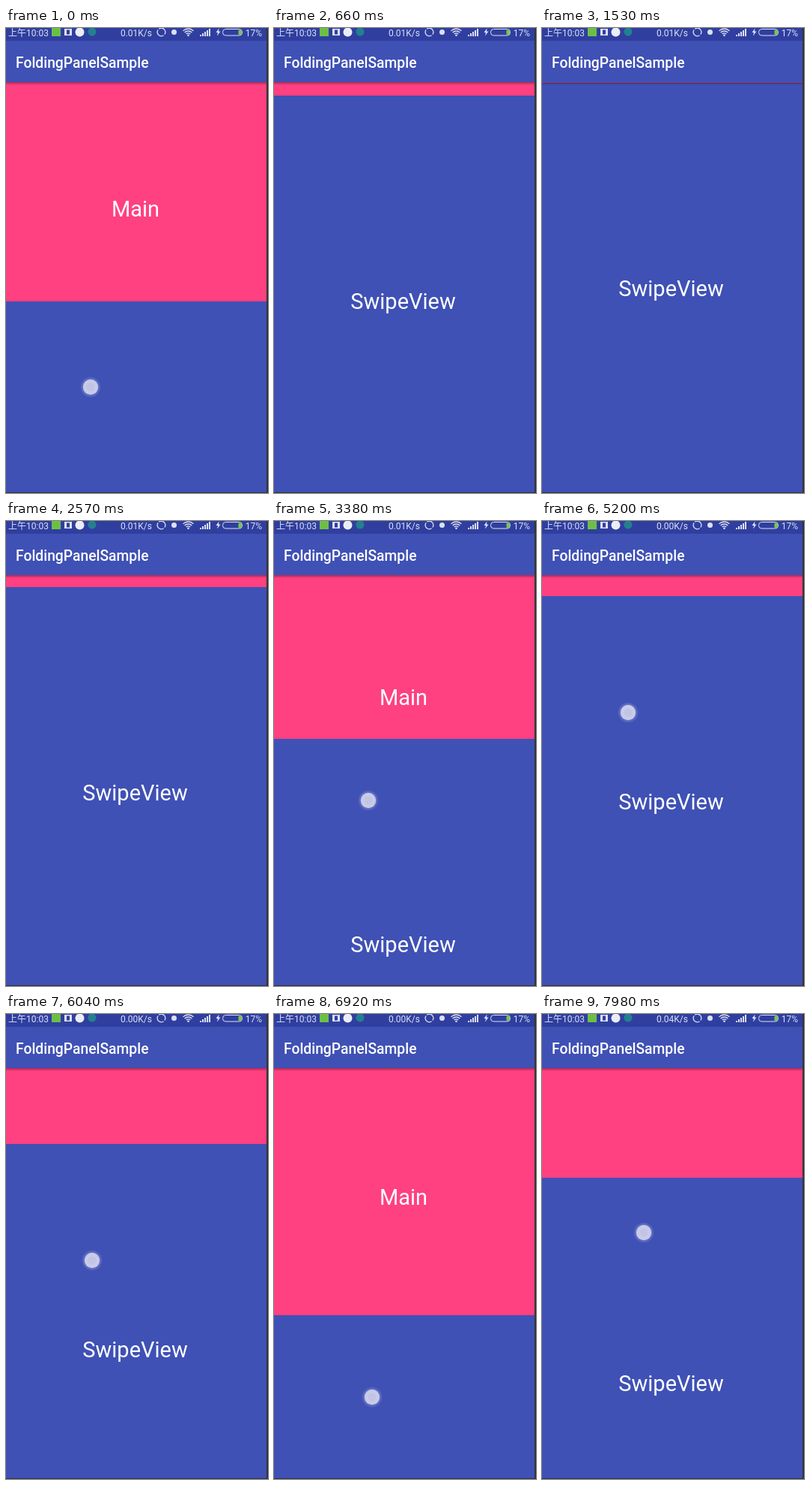
An HTML page with a canvas that plays this animation: 350 by 619 pixels, repeating every 8 s.

```html
<!DOCTYPE html>
<html lang="en">
<head>
<meta charset="utf-8">
<title>Swipe panel</title>
<style>
  html, body { margin: 0; width: 100%; height: 100%; overflow: hidden; background: #333; }
  canvas { display: block; }
</style>
</head>
<body>
<canvas id="stage" width="350" height="619"></canvas>
<script>
const c = document.getElementById('stage').getContext('2d');
const LOOP = 8000, W = 348, H = 618, BAR = 72;
const BLUE = '#3f51b5', PINK = '#ff4081', LIGHT = '#dce0f3';
const FONT = 'Roboto, "Noto Sans CJK SC", "Noto Sans CJK", sans-serif';

const TICKS = [[0, 0], [1, 120], [8, 1110], [9, 1260], [11, 1530], [17, 2300], [18, 2420], [19, 2570],
  [25, 3380], [26, 3530], [31, 4230], [33, 4510], [34, 4650], [41, 5650], [42, 5770], [44, 6040],
  [49, 6770], [50, 6920], [57, 7830], [58, 7980]];

// Top edge of the panel: [time, y]
const EDGE = [[0, 364], [250, 260], [450, 120], [600, 73], [700, 73], [1000, 330], [1250, 244],
  [1400, 120], [1530, 73], [1650, 73], [1900, 170], [2150, 244], [2400, 150], [2570, 88], [2650, 73],
  [2800, 73], [3380, 290], [3900, 414], [4230, 414], [4500, 300], [4750, 100], [4900, 73], [5050, 73],
  [5400, 400], [5500, 414], [5750, 310], [6040, 173], [6200, 73], [6350, 73], [6700, 390], [6800, 414],
  [6920, 401], [7060, 319], [7300, 73], [7400, 73], [7700, 319], [7830, 319], [7980, 218]];

// Finger presses: [from, to, x, distance below the edge]
const PRESSES = [[0, 480, 113, 114], [690, 1240, 118, 90], [1650, 2200, 122, 82], [2780, 4620, 126, 82],
  [5000, 6130, 115, 155], [6330, 7160, 131, 109], [7380, LOOP, 136, 73]];

function snap(t) {
  let i = TICKS.length - 1;
  while (TICKS[i][1] > t) i--;
  if (i === TICKS.length - 1) return TICKS[i][1];
  const [n0, t0] = TICKS[i], [n1, t1] = TICKS[i + 1];
  const step = (t1 - t0) / (n1 - n0);
  return t0 + Math.floor((t - t0) / step) * step;
}

function track(keys, t) {
  const i = keys.findIndex(k => k[0] > t);
  if (i < 0) return keys[keys.length - 1][1];
  const [t0, a] = keys[i - 1], [t1, b] = keys[i];
  return a + (b - a) * (t - t0) / (t1 - t0);
}

function rect(x, y, w, h, color) {
  c.fillStyle = color;
  c.fillRect(x, y, w, h);
}

function disc(x, y, r, color) {
  c.fillStyle = color;
  c.beginPath();
  c.arc(x, y, r, 0, 7);
  c.fill();
}

function arc(x, y, r, from, to) {
  c.beginPath();
  c.arc(x, y, r, from, to);
  c.stroke();
}

function round(x, y, w, h, r) {
  c.beginPath();
  c.roundRect(x, y, w, h, r);
}

function text(s, x, y, size, align = 'center', weight = 400, color = '#fff') {
  c.font = `${weight} ${size}px ${FONT}`;
  c.textAlign = align;
  c.fillStyle = color;
  c.fillText(s, x, y);
}

function statusBar(t) {
  rect(0, 0, W, 17, '#303f9f');
  const label = (s, x, align) => text(s, x, 10.5, 12, align, 400, LIGHT);
  label('上午10:03', 3, 'left');
  label(t < 3530 ? '0.01K/s' : t < 7400 ? '0.00K/s' : '0.04K/s', 195, 'right');
  label('17%', 342, 'right');

  rect(61, 0, 12, 11, '#6cbf45');
  rect(78, 1, 10, 9, LIGHT);
  rect(81, 2.5, 4, 6, '#303f9f');
  disc(98.5, 5.5, 6, '#eceef6');
  disc(115, 5, 5.5, '#24808f');
  disc(224.5, 5.5, 3.5, LIGHT);

  c.strokeStyle = LIGHT;
  c.lineWidth = 1.3;
  arc(207.5, 5.5, 5.3, -2.2, 0.6);
  arc(207.5, 5.5, 5.3, 0.95, 3.75);
  for (const r of [4, 7, 10]) arc(243.5, 11, r, -2.35, -0.8);
  disc(243.5, 9.8, 1.3, LIGHT);
  for (let i = 0; i < 5; i++) rect(259 + i * 3, 9 - i * 2, 2, 2 + i * 2, LIGHT);

  c.fillStyle = LIGHT;
  c.beginPath();
  [[284.5, 0.5], [280.5, 6], [283, 6], [282, 10.5], [286.5, 4.5], [284, 4.5]].forEach(p => c.lineTo(...p));
  c.fill();
  c.lineWidth = 1;
  round(289.5, 1.5, 26, 8.5, 4);
  c.stroke();
  c.fillStyle = '#74c94c';
  round(310.5, 2.5, 4.5, 6.5, [0, 3, 3, 0]);
  c.fill();
}

function appBar(t) {
  rect(0, 0, W, BAR, BLUE);
  statusBar(t);
  text('FoldingPanelSample', 13, 52.5, 19.3, 'left', 500);
  const shade = c.createLinearGradient(0, BAR, 0, BAR + 4);
  shade.addColorStop(0, 'rgba(0,0,0,.34)');
  shade.addColorStop(1, 'rgba(0,0,0,0)');
  rect(0, BAR, W, 4, shade);
}

function finger(x, y) {
  disc(x, y, 13.5, 'rgba(255,255,255,.08)');
  disc(x, y, 12, 'rgba(255,255,255,.1)');
  disc(x, y, 10.2, 'rgba(232,232,246,.76)');
  disc(x, y, 5.5, 'rgba(170,175,215,.22)');
}

function draw(now) {
  const t = snap(now % LOOP);
  const edge = Math.round(track(EDGE, t));
  rect(0, 0, 350, 619, '#333');
  c.save();
  c.beginPath();
  c.rect(0, 0, W, H);
  c.clip();
  rect(0, BAR, W, H - BAR, PINK);
  text('Main', 173, 254 - Math.max(0, 401 - edge) * 0.08, 29);
  rect(0, edge, W, H, BLUE);
  text('SwipeView', 172.5, edge + 284, 29);
  appBar(t);
  const press = PRESSES.find(([from, to]) => t >= from && t < to);
  if (press) finger(press[2], edge + press[3]);
  c.restore();
  requestAnimationFrame(draw);
}

requestAnimationFrame(draw);
</script>
</body>
</html>
```
